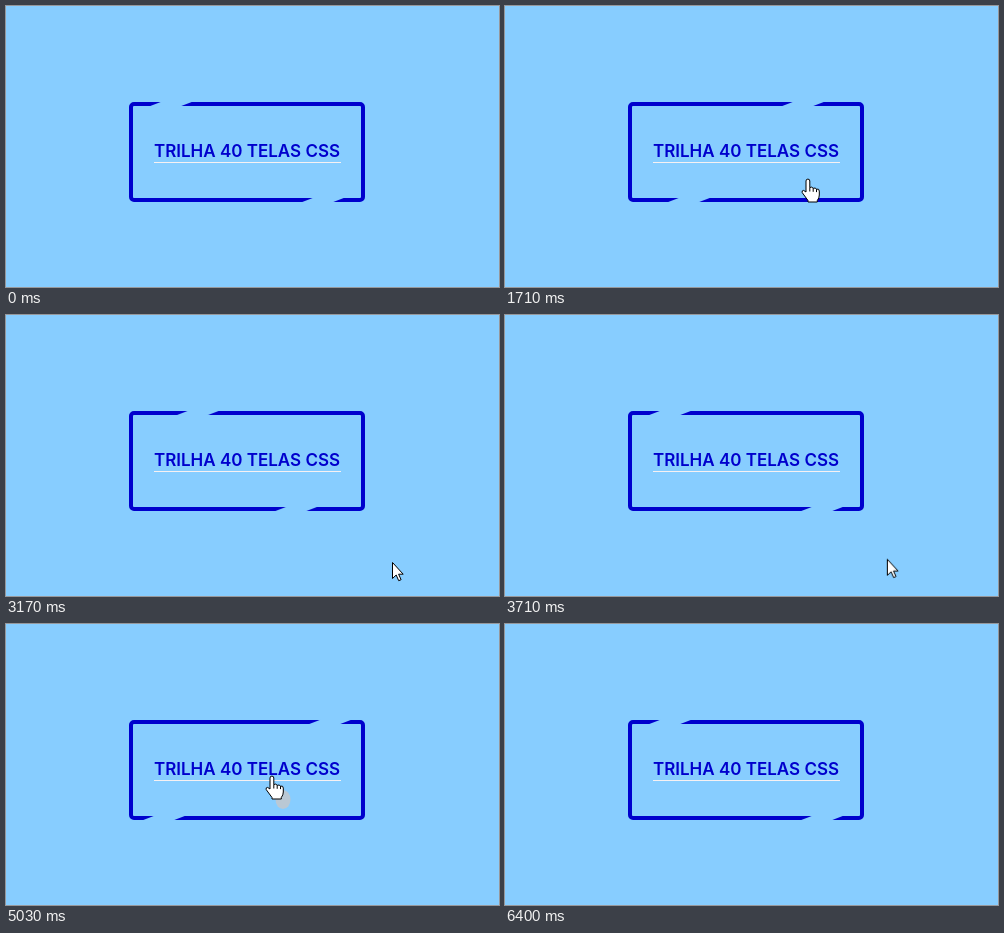
Animation of 493x281 px, one loop 6880 ms. Source, as an HTML page:

```html
<!DOCTYPE html>
<html lang="pt">
<head>
<meta charset="utf-8">
<title>Trilha</title>
<style>
  html, body { margin: 0; width: 100%; height: 100%; overflow: hidden; background: #87cdff; }
  svg { display: block; width: 493px; height: 281px; }
  .box { fill: none; stroke: #0000cd; stroke-width: 4; }
  .gap { fill: #87cdff; }
  .label { font: 600 17px Inter, sans-serif; fill: #0000cd; text-anchor: middle; }
  .line { fill: #f7f1f2; }
  .smear { fill: #bac8d4; }
  .pointer path { fill: #fff; stroke: #000; stroke-linejoin: round; }
</style>
</head>
<body>
<svg viewBox="0 0 493 281">
  <rect class="box" x="125" y="98" width="232" height="96" rx="3"/>
  <path class="gap" d="M156 95.5h31l-13 5h-31z"/>
  <g transform="rotate(180 241 146)"><path class="gap" d="M156 95.5h31l-13 5h-31z"/></g>
  <text class="label" x="241" y="150.5">TRILHA 40 TELAS CSS</text>
  <rect class="line" x="148" y="156" width="187" height="1"/>
  <ellipse class="smear" cx="277" cy="175.5" rx="7.5" ry="9.5"/>
  <g class="pointer">
    <g class="hand">
      <path d="M-2 12V1a1.9 1.9 0 0 1 3.8 0V7.5q2.2-1.2 3.4 .8q2.2-.9 3.3 .8q2.8-.6 2.8 2V15q0 3-2 5.5V22H0V20.5L-5.8 12.6q-.6-2.2 1.4-2.2z"/>
      <path d="M1.8 7.5v4M5.2 8.3v3.5M8.5 9.1v3"/>
    </g>
    <path class="arrow" d="M.5 .5V16.5l3.7-3.5 2.5 5.7 2.4-1-2.5-5.5H11.2z"/>
  </g>
</svg>
<script>
  const LOOP = 6880;
  const SLIDE = 900;
  const TRAVEL = 159;
  const RUSH = 'cubic-bezier(.7, 0, .84, 0)';

  const hovers = [{ enter: 1228, leave: 2693 }, { enter: 4073, leave: 5440 }];
  const spots = {
    start: [340, 243], inside: [303, 174], aside: [386, 247],
    label: [266, 153], edge: [384, 231], gone: [382, 283]
  };
  const trips = [
    { from: 'start', to: 'inside', begin: 850, end: 1500, ease: 'ease-out' },
    { from: 'inside', to: 'aside', begin: 2380, end: 2940, ease: 'ease-in' },
    { from: 'aside', to: 'label', begin: 3180, end: 4190, ease: RUSH },
    { from: 'label', to: 'edge', begin: 5060, end: 5650, ease: 'ease-in' },
    { from: 'edge', to: 'gone', begin: 5700, end: 6330, ease: 'ease-in' }
  ];

  // Each step is [time, value, easing until the next step].
  function play(name, prop, steps) {
    const all = [[0, steps[0][1]], ...steps, [LOOP, steps.at(-1)[1]]];
    const frames = all.map(([time, value, easing = 'step-end']) =>
      ({ offset: time / LOOP, [prop]: value, easing }));
    document.querySelectorAll('.' + name).forEach(part =>
      part.animate(frames, { duration: LOOP, iterations: Infinity }));
  }

  const shift = (x, y = 0) => `translate(${x}px, ${y}px)`;

  // Opacity is `on` between each pair of times and the opposite elsewhere.
  function toggle(name, spans, on = 1) {
    const steps = spans.flatMap(([from, to]) => [[from, on], [to, 1 - on]]);
    play(name, 'opacity', [[0, 1 - on], ...steps]);
  }

  play('gap', 'transform', hovers.flatMap(({ enter, leave }) => [
    [enter, shift(0), 'ease'], [enter + SLIDE, shift(TRAVEL)],
    [leave, shift(TRAVEL), 'ease'], [leave + SLIDE, shift(0)]
  ]));

  play('pointer', 'transform', trips.flatMap(({ from, to, begin, end, ease }) => [
    [begin, shift(...spots[from]), ease], [end, shift(...spots[to])]
  ]));

  const inside = hovers.map(({ enter, leave }) => [enter, leave]);
  toggle('hand', inside);
  toggle('arrow', inside, 0);
  toggle('pointer', [[trips[0].begin, trips.at(-1).end]]);
  toggle('smear', [[trips[2].end, trips[3].begin + 200]]);
</script>
</body>
</html>
```
